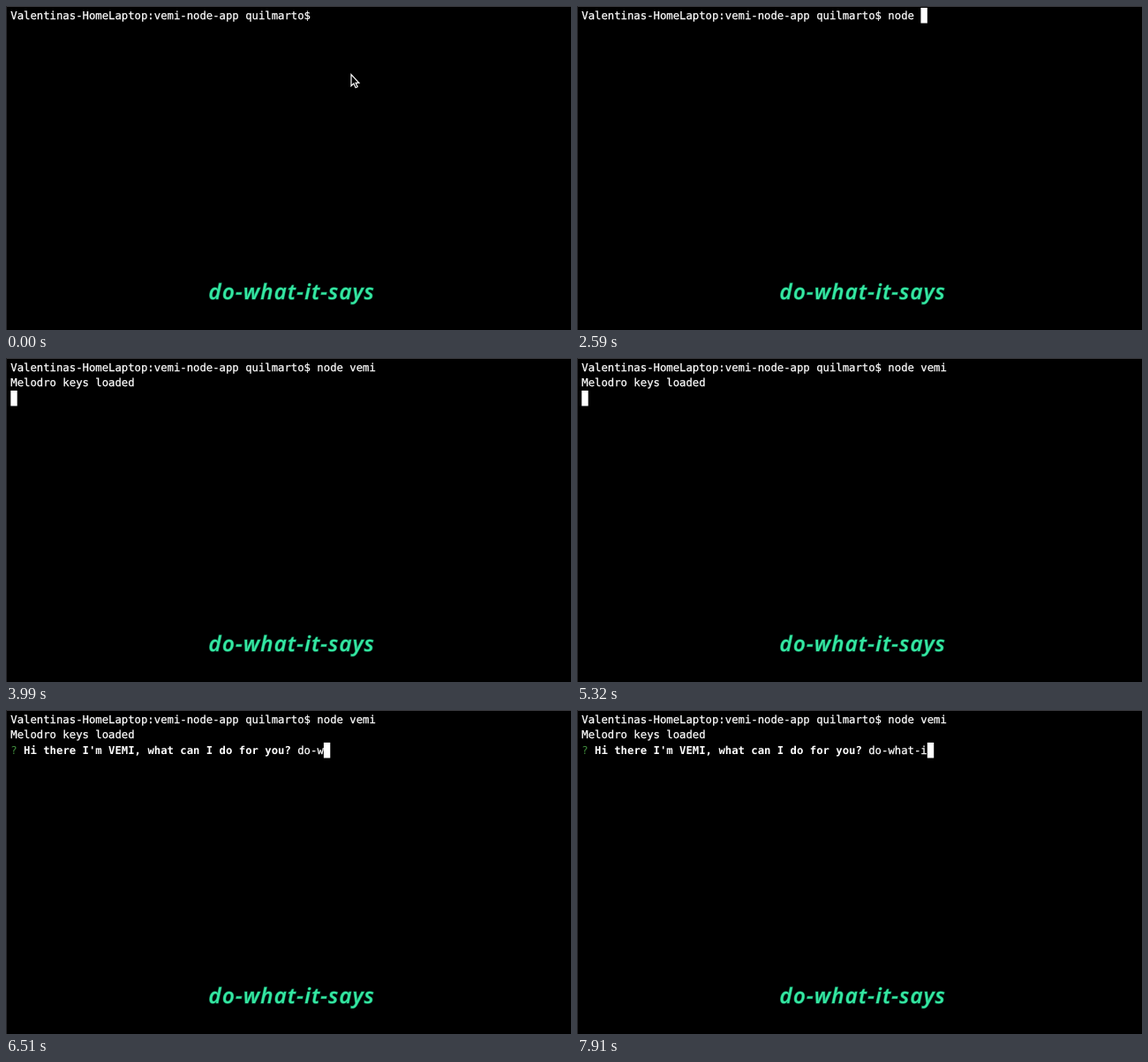
An HTML page for the animation above (8 s loop, 640 by 368 pixels).

```html
<!DOCTYPE html>
<html lang="en">
<head>
<meta charset="utf-8">
<title>Terminal</title>
<style>
  html, body { margin: 0; width: 100%; height: 100%; overflow: hidden; background: #000; }
  svg { display: block; width: 640px; height: 368px; }
  text { white-space: pre; text-rendering: geometricPrecision; }
  .term { font: 12.27px "DejaVu Sans Mono", monospace; fill: #fff; stroke: #fff; stroke-width: .25px; }
  .bold { font-weight: 700; stroke: none; }
  .mark { fill: #3f8a3c; stroke: none; }
  .caption {
    font: italic 600 24px "Open Sans", "Noto Sans", sans-serif; letter-spacing: 1.35px;
    fill: #35e8a2; stroke: #0d6b4a; stroke-width: 1.2px; paint-order: stroke;
  }
</style>
</head>
<body>
<svg viewBox="0 0 640 368">
  <rect width="640" height="368"/>
  <path d="M0 .5H640" stroke="#3b3b40"/>
  <path d="M.5 0V368" stroke="#26262a"/>
  <g class="term">
    <text x="5.3" y="15" id="command"></text>
    <text x="5.3" y="32.4" id="output">Melodro keys loaded</text>
    <text x="5.3" y="50" id="question"><tspan class="mark">? </tspan><tspan class="bold" id="ask"></tspan><tspan id="answer"></tspan></text>
  </g>
  <rect id="cursor" width="7.4" height="17.5" fill="#fff"/>
  <path id="pointer" d="M391 77.8V90.8l2.9-2.7 2.2 4.6 2.1-.9-2.1-4.5h3.8z" fill="#000" stroke="#fff" stroke-width="1.2"/>
  <text class="caption" x="229.5" y="333">do-what-it-says</text>
</svg>
<script>
const LOOP = 8000, LEFT = 5.3, CHAR = 7.387, ROW = 17.5;
const PROMPT = "Valentinas-HomeLaptop:vemi-node-app quilmarto$ ";
const ASK = "Hi there I'm VEMI, what can I do for you? ";

const COMMAND = "node vemi";
const commandTimes = [1680, 1750, 1820, 1890, 2590, 2730, 2940, 3150, 3360];
const ANSWER = "do-what-i";
const answerTimes = [5460, 5460, 6440, 6510, 6720, 6790, 6930, 7700, 7910];

const ENTER = 3780, LOADED = 3990, ASKED = 5390;
const cursorOff = [[0, 70], [560, 1085], [1610, 1680], [4340, 4830], [5810, 6090]];

const el = id => document.getElementById(id);
const show = (id, on) => el(id).setAttribute("visibility", on ? "visible" : "hidden");
const typed = (text, times, t) => text.slice(0, times.filter(at => at <= t).length);

function draw(t) {
  const command = PROMPT + typed(COMMAND, commandTimes, t);
  const answer = typed(ANSWER, answerTimes, t);
  el("command").textContent = command;
  el("answer").textContent = answer;
  show("output", t >= LOADED);
  show("question", t >= ASKED);
  show("pointer", t < commandTimes[0]);

  const row = t < ENTER ? 0 : t < LOADED ? 1 : 2;
  const column = t < ENTER ? command.length : t < ASKED ? 0 : 2 + ASK.length + answer.length;
  el("cursor").setAttribute("x", LEFT + column * CHAR);
  el("cursor").setAttribute("y", 2 + row * ROW);
  show("cursor", !cursorOff.some(([from, to]) => t >= from && t < to));
}

el("ask").textContent = ASK;
const start = performance.now();
function tick() {
  draw((performance.now() - start) % LOOP);
  requestAnimationFrame(tick);
}
draw(0);
tick();
</script>
</body>
</html>
```
